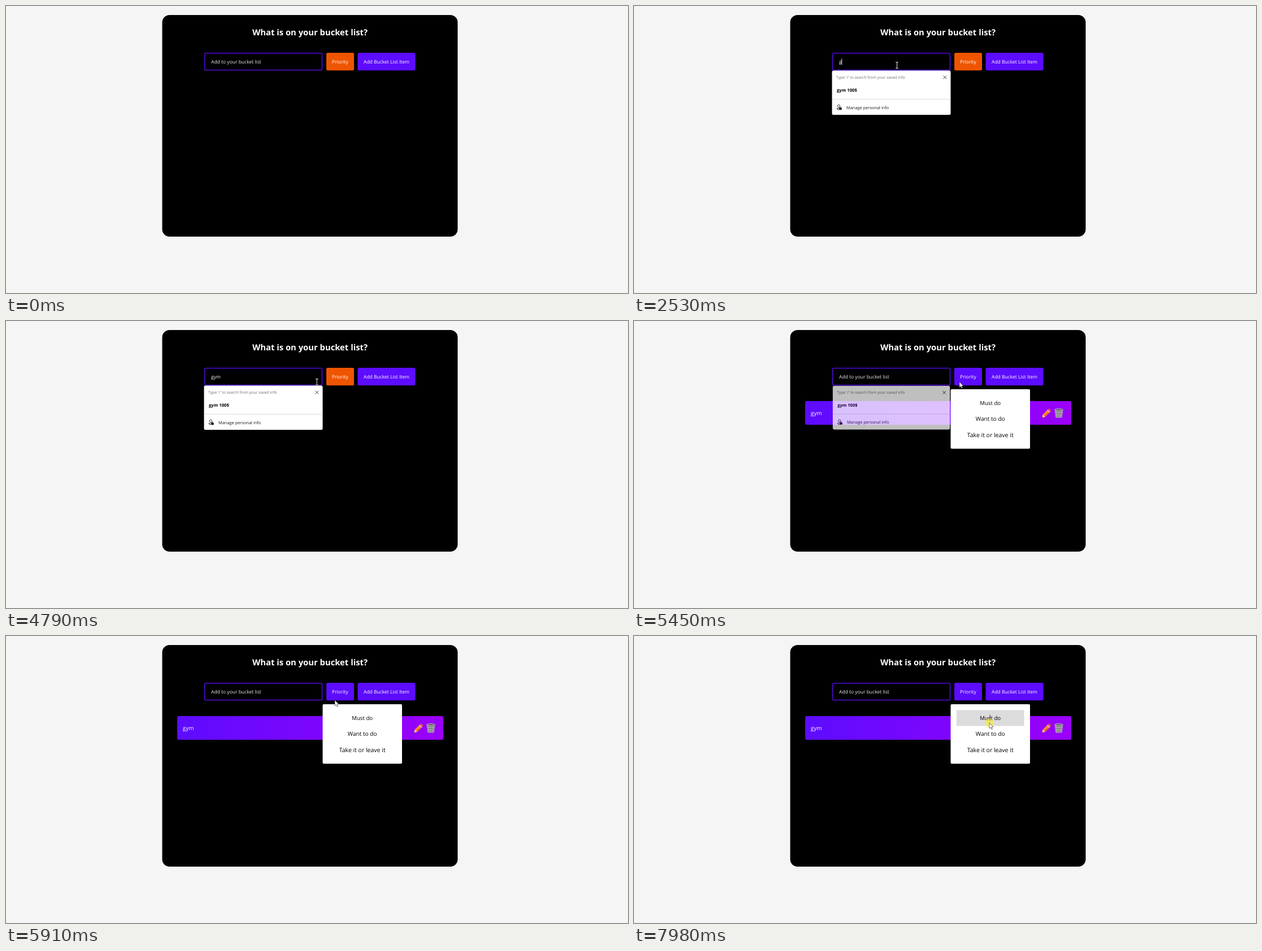
Write an HTML page that moves like this. It is 1101x509 px and loops after 8 s.

```html
<!DOCTYPE html>
<html lang="en">
<head>
<meta charset="utf-8">
<title>Bucket list</title>
<style>
  html, body { margin: 0; width: 100%; height: 100%; overflow: hidden; background: #f5f5f5; }
  svg { display: block; width: 100vw; height: 100vh; }
  text { font-family: "Open Sans", "Noto Sans", sans-serif; text-rendering: geometricPrecision; }
  .mid { text-anchor: middle; }
  .form { font-size: 8.5px; fill: #fff; }
  .entry { font-size: 7.7px; font-weight: 700; fill: #000; }
  #beam { mix-blend-mode: difference; }
</style>
</head>
<body>
<svg viewBox="0 0 1101 509" xmlns="http://www.w3.org/2000/svg">
  <defs>
    <linearGradient id="violet">
      <stop offset="0" stop-color="#5d0cff"/>
      <stop offset="1" stop-color="#9b00fa"/>
    </linearGradient>
  </defs>
  <rect width="1101" height="509" fill="#f5f5f5"/>
  <rect x="276.5" y="16" width="523" height="393" rx="13"/>
  <text class="mid" x="538" y="52.3" font-size="14.8" font-weight="700" fill="#fff">What is on your bucket list?</text>

  <rect x="351.7" y="83.7" width="207.8" height="30" rx="2" stroke="#5d0cff" stroke-width="1.3"/>
  <text id="field" class="form" x="363" y="102"></text>
  <rect id="caret" y="93.5" width="0.9" height="10.5" fill="#fff"/>
  <rect id="priority" x="567" y="83" width="49" height="31.3" rx="2.5"/>
  <text class="form mid" x="591.5" y="102">Priority</text>
  <rect x="622.5" y="83" width="102" height="31.3" rx="2.5" fill="#5d0cff"/>
  <text class="form mid" x="673.5" y="102">Add Bucket List Item</text>

  <g id="row">
    <rect x="303" y="142" width="471" height="42" rx="3" fill="url(#violet)"/>
    <text x="312.7" y="167" font-size="10" fill="#fff">gym</text>
    <g transform="translate(722 171.8) rotate(-45)">
      <path d="M0 0L5.5 -3V3Z" fill="#ffd0a0"/>
      <path d="M0 0L2.2 -1.2V1.2Z" fill="#4a3b55"/>
      <path d="M5.5 -3H15.5V3H5.5Z" fill="#ff8a2b"/>
      <path d="M5.5 1H15.5V3H5.5Z" fill="#e0602a"/>
      <path d="M15.5 -3H17.5V3H15.5Z" fill="#d6c6cc"/>
      <path d="M17.5 -3H19.5Q21 -3 21 0T19.5 3H17.5Z" fill="#f2495c"/>
    </g>
    <path d="M744.8 158H759.2L757.2 171.3H746.8Z" fill="#77707f"/>
    <path d="M746 162.3H758M746.5 166.5H757.5M747 170.8H757M748 158.5L749.2 171M752 158.5V171M756 158.5L754.8 171M745.2 158.5L747 171M758.8 158.5L757 171" fill="none" stroke="#c9c9cc" stroke-width="0.8"/>
    <ellipse cx="752" cy="157.4" rx="7.6" ry="1.7" fill="#5d5864" stroke="#c4c4c6"/>
  </g>

  <g id="popup">
    <rect id="sheet" x="350.5" y="114.5" width="210" rx="2.5" fill="#fff"/>
    <text x="358" y="129" font-size="6.85" fill="#6b6b6b">Type '/' to search from your saved info</text>
    <path d="M547.5 123.7L553.1 129.3M553.1 123.7L547.5 129.3" stroke="#222" stroke-width="0.9"/>
    <text class="entry" x="359" y="152.4">gym 100$</text>
    <g id="others">
      <text class="entry" x="359" y="177.3">hello</text>
      <text class="entry" x="359" y="202.1">ORVINA TRELLEM QUSAND</text>
    </g>
    <g id="footer">
      <path d="M350.5 214.9H560.5" stroke="#d6d6d6" stroke-width="0.9"/>
      <circle cx="362.4" cy="227" r="2.2" fill="none" stroke="#222" stroke-width="0.9"/>
      <path d="M362.5 233.8Q359 233.6 359 231.2H362.5" fill="none" stroke="#222" stroke-width="0.9"/>
      <rect x="362.8" y="229.8" width="5" height="4" rx="0.8" fill="#222"/>
      <path d="M364.2 229.8V228.9H366.4V229.8" fill="none" stroke="#222" stroke-width="0.7"/>
      <text x="376" y="232.3" font-size="7.43" fill="#1a1a1a">Manage personal info</text>
    </g>
  </g>

  <g id="menu">
    <rect x="560.5" y="121" width="140.5" height="105.5" rx="2" fill="#fff"/>
    <rect id="hover" x="570.8" width="119.7" height="28.2" fill="#dcdcdc"/>
    <text class="mid" x="630.7" y="149.3" font-size="9.7">Must do</text>
    <text class="mid" x="630.7" y="177.4" font-size="10.1">Want to do</text>
    <text class="mid" x="630.7" y="205.5" font-size="10.5">Take it or leave it</text>
    <rect id="mark" x="629.8" y="139.5" width="0.9" height="11" fill="#222"/>
  </g>

  <circle id="click" r="7.7" fill="#fff000" fill-opacity="0.5"/>
  <path id="arrow" d="M0 0V9.8L2.3 7.8L3.8 11.4L5.4 10.7L3.9 7.2H7Z" fill="#fff" stroke="#222" stroke-width="0.6"/>
  <path id="beam" d="M-2 -5.2H3M0.5 -5.2V5.4M-2 5.4H3" fill="none" stroke="#fff" stroke-width="0.9"/>
</svg>
<script>
const LOOP = 8000, BLINK = 530;
const FOCUS = 1270, OPEN = 4990, ENTER = 5450, CLICK = 7980;

// [time, typed text, caret x]
const edits = [
  [FOCUS, "", 363],
  [2530, "g", 367.3],
  [2730, "gy", 371.2],
  [3860, "gym", 378.8]
];

// [start, end, steps, x, y, ease-out power]
const moves = [
  [120, 320, 4, 658, 246, 1.5],
  [530, 800, 5, 463, 97, 1.5],
  [860, 930, 2, 465, 105, 1],
  [4390, 5190, 13, 577, 109, 1.83],
  [5250, 5250, 1, 576, 108, 1],
  [5840, 6640, 11, 637, 167, 1.1],
  [6700, 6840, 3, 632, 154, 1],
  [7180, 7240, 2, 629, 154, 1]
];

const el = {};
document.querySelectorAll("svg [id]").forEach(e => el[e.id] = e);
const set = (id, name, value) => el[id].setAttribute(name, value);
const show = (id, on) => set(id, "display", on ? "inline" : "none");
const inside = (x, y, l, t, r, b) => x >= l && x < r && y >= t && y < b;

// Stepped progress: the first step lands on start, the last on end.
function stepped(t, start, end, n) {
  if (t < start) return 0;
  if (t >= end) return 1;
  return (1 + Math.floor((t - start) / (end - start) * (n - 1) + 0.02)) / n;
}

function pointer(t) {
  let x = 1173, y = 618;
  for (const [start, end, n, toX, toY, power] of moves) {
    const p = 1 - Math.pow(1 - stepped(t, start, end, n), power);
    x += (toX - x) * p;
    y += (toY - y) * p;
  }
  return [x, y];
}

function drawField(t) {
  const edit = t < ENTER ? edits.filter(e => e[0] <= t).pop() : null;
  const typed = edit ? edit[1] : "";
  el.field.textContent = typed || "Add to your bucket list";
  set("field", "fill-opacity", typed || edit ? 1 : 0.92);
  show("caret", edit && Math.floor((t - edit[0]) / BLINK) % 2 === 0);
  if (edit) set("caret", "x", edit[2]);
}

function drawPopup(t) {
  const fade = stepped(t, ENTER, 5640, 4);
  const short = t >= 2530;
  show("popup", t >= FOCUS && fade < 1);
  show("others", !short);
  set("sheet", "height", short ? 78.5 : 128.3);
  set("footer", "transform", `translate(0 ${short ? -49.6 : 0})`);
  set("popup", "opacity", 1 - fade);
  set("popup", "transform", `translate(455.5 153.75) scale(${1 - 0.05 * fade}) translate(-455.5 -153.75)`);
}

function drawMenu(t, x, y) {
  const item = Math.floor((y - 131.4) / 28.2);
  show("menu", t >= OPEN);
  set("priority", "fill", t >= OPEN ? "#5d0cff" : "#ef5500");
  show("hover", inside(x, y, 570.8, 131.4, 690.5, 216));
  set("hover", "y", 131.4 + 28.2 * item);
  show("mark", t >= CLICK);
}

function drawPointer(t, x, y) {
  const overText = inside(x, y, 351, 83, 560, 114) ||
    t >= OPEN && (inside(x, y, 612, 139, 649, 152) || inside(x, y, 605, 166, 657, 181));
  const at = `translate(${x} ${y})`;
  for (const id of ["arrow", "beam", "click"]) set(id, "transform", at);
  show("arrow", !overText);
  show("beam", overText);
  show("click", t >= FOCUS && t < 1400 || t >= CLICK);
}

function draw(t) {
  const [x, y] = pointer(t);
  drawField(t);
  show("row", t >= ENTER);
  drawPopup(t);
  drawMenu(t, x, y);
  drawPointer(t, x, y);
}

const begin = performance.now();
function tick() {
  draw((performance.now() - begin) % LOOP);
  requestAnimationFrame(tick);
}
tick();
</script>
</body>
</html>
```
